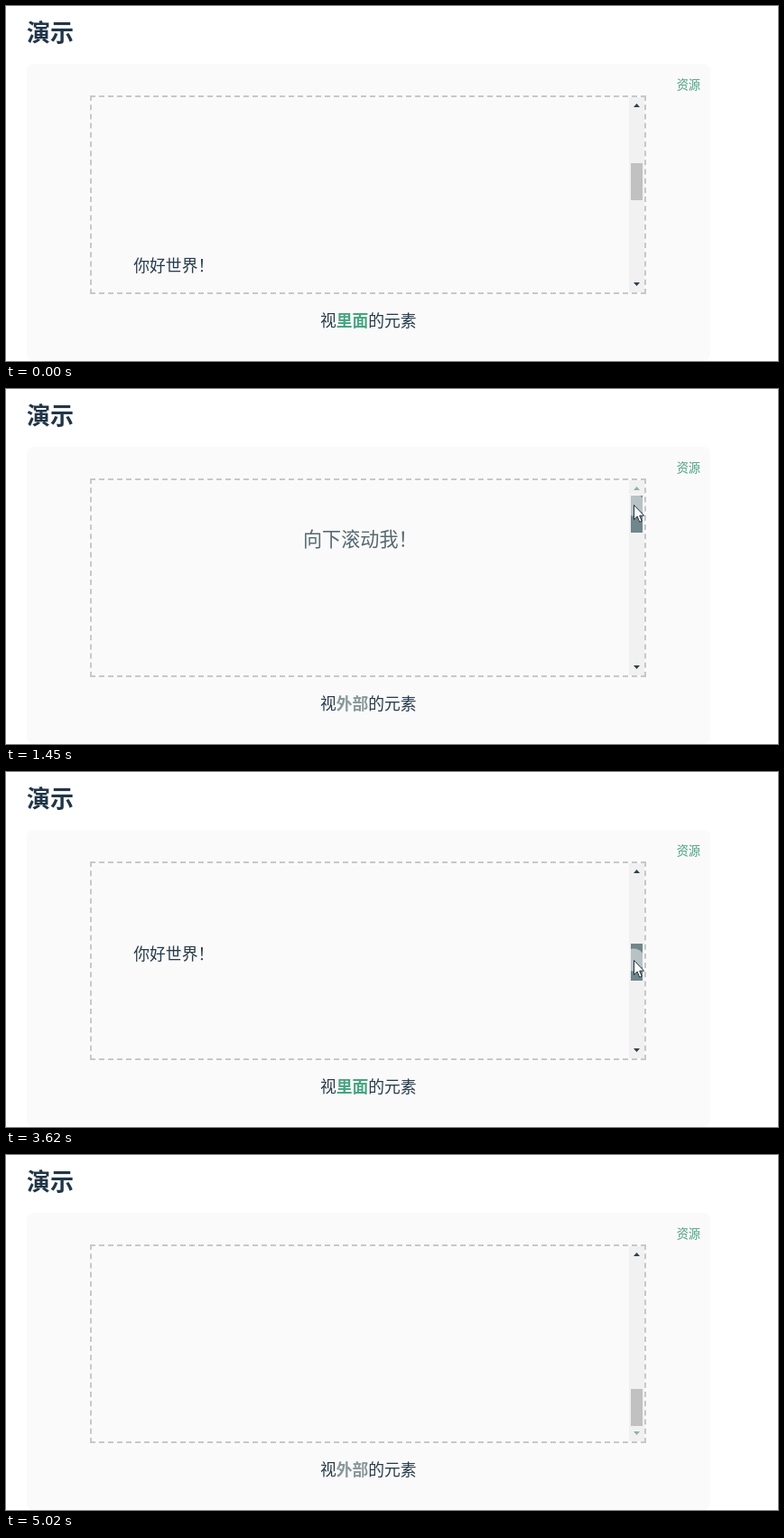
An HTML page that plays this animation: 855 by 393 pixels, repeating every 5420 ms.

```html
<!DOCTYPE html>
<html lang="zh">
<head>
<meta charset="utf-8">
<title>演示</title>
<style>
  html, body { margin: 0; width: 100%; height: 100%; overflow: hidden; background: #fff; }
  .card, .box, svg { position: absolute; box-sizing: border-box; }
  .card { left: 23px; top: 64px; width: 757px; height: 329px; border-radius: 8px; background: #fafafa; }
  .box { left: 93px; top: 99px; width: 616px; height: 220px; border: 2px dashed #c8c8c8; }
  svg { left: 0; top: 0; }
  text { font: 300 17.8px Inter, "Noto Sans CJK SC", "Noto Sans CJK", sans-serif; fill: #263a4b; }
  #title { font-size: 26px; font-weight: 700; fill: #213547; }
  #link { font-size: 13.2px; fill: #4a9f7e; }
  #hint { font-size: 21.1px; fill: #55696f; }
  #word { font-weight: 600; }
</style>
</head>
<body>
<div class="card"></div>
<div class="box"></div>
<svg width="855" height="393" viewBox="0 0 855 393">
  <clipPath id="view"><rect x="95" y="101" width="595" height="216"/></clipPath>
  <text id="title" x="23" y="39">演示</text>
  <text id="link" x="769" y="92" text-anchor="end">资源</text>
  <g clip-path="url(#view)">
    <g id="content">
      <text id="hint" x="329" y="174">向下滚动我！</text>
      <text x="141.3" y="591">你好世界！</text>
    </g>
  </g>
  <rect x="690" y="101" width="17" height="216" fill="#f1f1f1"/>
  <path id="up" d="M695 112L698.5 108L702 112Z"/>
  <path id="down" d="M695 306L698.5 310L702 306Z"/>
  <rect id="thumb" x="692" width="13" height="41"/>
  <text x="401.3" y="355" text-anchor="middle">视<tspan id="word"></tspan>的元素</text>
  <g id="cursor">
    <circle r="12.5" fill="#fafafa" fill-opacity=".52"/>
    <path d="M.5 .5V16.5L4.2 13L6.7 19.2L9.2 18.2L6.7 12.2H11.6Z" fill="#fff" stroke="#1f3342"/>
  </g>
</svg>
<script>
const LOOP = 5420, STEP = 70, TOP = 118, BOTTOM = 259, RATIO = 5.3;
const $ = id => document.getElementById(id);
const smooth = u => u * u * (3 - 2 * u);

// A value that eases to each target in turn; a move is [start, end, target].
const track = (from, ...moves) => t => moves.reduce((v, [start, end, to]) => {
  const u = Math.min(1, Math.max(0, (t - start) / (end - start)));
  return v + (to - v) * smooth(u);
}, from);

const thumbY = track(174, [655, 1240, TOP], [2270, 3350, 187], [3480, 4080, 211], [4060, 4550, BOTTOM]);
const cursorX = track(779, [70, 550, 699], [655, 1240, 695], [4670, 4950, 765]);
// Height of the pointer tip below the top of the thumb
const grip = track(150, [70, 550, 12], [655, 1240, 10], [2270, 2580, 17.5], [4670, 4950, 93]);

// The picture updates every STEP, counted from the latest of these times.
const starts = [0, 680, 2370, 3550];
function snap(t) {
  const start = starts.filter(s => s <= t).pop();
  return start + Math.floor((t - start) / STEP) * STEP;
}

// The label flips at these times and is translated shortly after.
const flips = [1030, 3140, 4180], TRANSLATE = 210;
function label(t) {
  const past = flips.filter(f => f <= t);
  const fresh = past.length > 0 && t - past[past.length - 1] < TRANSLATE;
  return past.length % 2
    ? [fresh ? 'outside' : '外部', '#87989a']
    : [fresh ? 'inside' : '里面', '#45a580'];
}

function thumbFill(t, x, shown) {
  if (t >= 680 && t < 4740) return '#70868a';
  return shown && x <= 705 ? '#a8a8a8' : '#c1c1c1';
}

function draw(t) {
  const pos = thumbY(t), top = Math.floor(pos);
  const x = Math.round(cursorX(t)), y = Math.round(pos + grip(t));
  const shown = t >= 70 && t < 5020;
  const arrowFill = off => off ? '#8fb0a5' : '#2f3f4a';

  $('content').setAttribute('transform', `translate(0 ${-Math.round((pos - TOP) * RATIO)})`);
  $('thumb').setAttribute('y', top);
  $('thumb').setAttribute('fill', thumbFill(t, x, shown));
  $('up').setAttribute('fill', arrowFill(top <= TOP));
  $('down').setAttribute('fill', arrowFill(top >= BOTTOM));
  $('cursor').setAttribute('transform', `translate(${x} ${y})`);
  $('cursor').style.display = shown ? '' : 'none';

  const [word, color] = label(t);
  $('word').textContent = word;
  $('word').style.fill = color;
}

const begin = performance.now();
function tick() {
  draw(snap((performance.now() - begin) % LOOP));
  requestAnimationFrame(tick);
}
tick();
</script>
</body>
</html>
```
